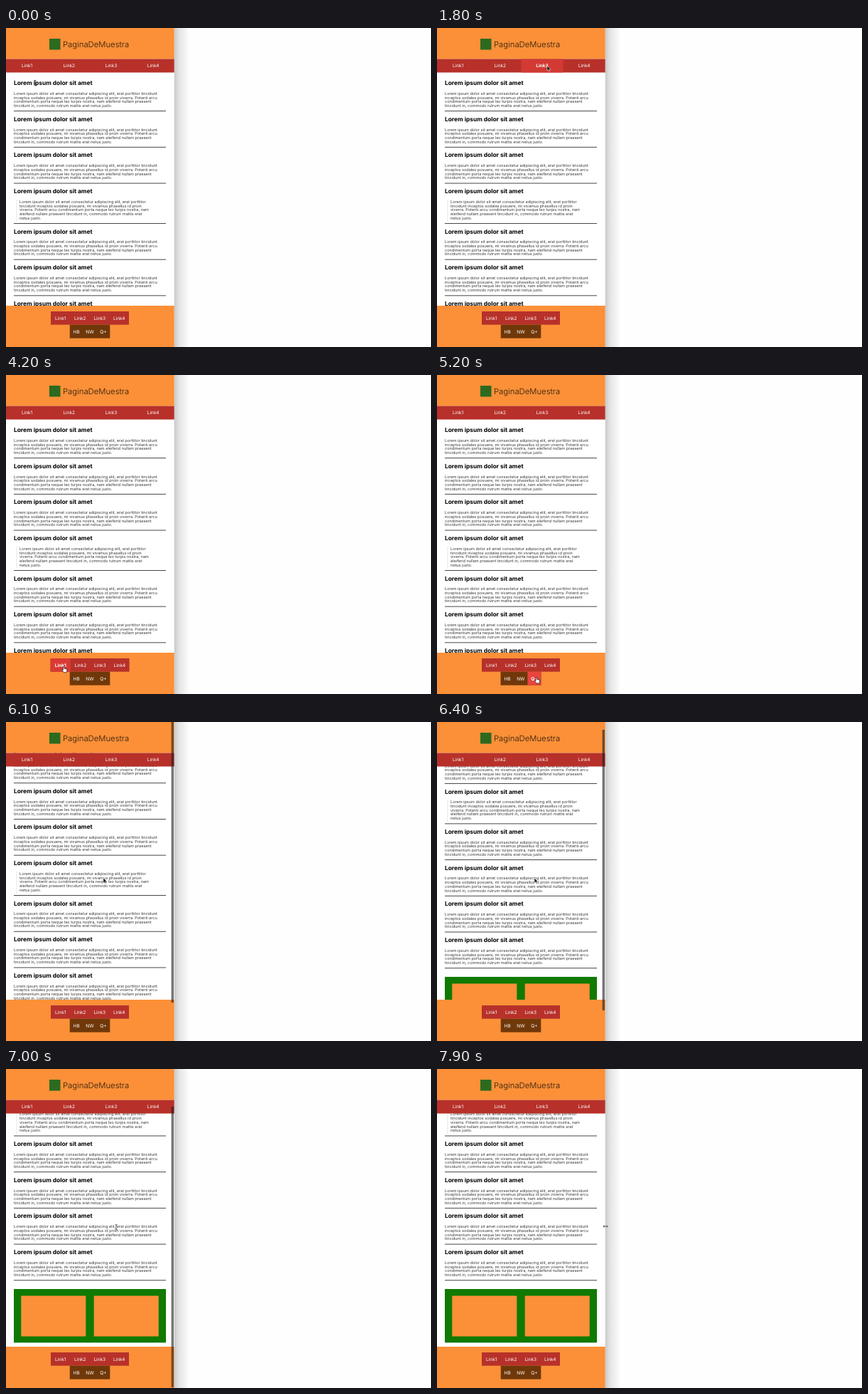
An HTML page that plays this animation: 598 by 448 pixels, repeating every 8 s.

```html
<!DOCTYPE html>
<html lang="es">
<head>
<meta charset="utf-8">
<title>Layout</title>
<style>
  html, body { margin: 0; width: 100%; height: 100%; overflow: hidden; background: #fefefe; }
  svg { display: block; width: 598px; height: 448px; }
  text { font: 400 5.55px Inter, Lato, sans-serif; fill: #3a3a3a; text-rendering: geometricPrecision; white-space: pre; }
  .heading { font-size: 8.4px; font-weight: 700; fill: #000; }
  .title { font-size: 11.3px; font-weight: 300; fill: #2b1a0c; }
  .link { font-size: 6.5px; fill: #fff; text-anchor: middle; }
  .bold { font-weight: 700; }
</style>
</head>
<body>
<svg id="stage" viewBox="0 0 598 448">
  <defs>
    <linearGradient id="shade">
      <stop offset="0" stop-color="#c6c6c6"/>
      <stop offset=".35" stop-color="#e4e4e4"/>
      <stop offset="1" stop-color="#fefefe"/>
    </linearGradient>
  </defs>
</svg>
<script>
(() => {
  const LOOP = 8000, STEP = 100, PAGE = 236.7, FOOTER = 390;
  const ORANGE = '#fb9038', RED = '#b7312a', BROWN = '#70380a', GREEN = '#107a02';
  const stage = document.getElementById('stage');

  function set(node, attrs) {
    for (const key in attrs) node.setAttribute(key, attrs[key]);
  }
  function add(parent, tag, attrs, content) {
    const node = document.createElementNS('http://www.w3.org/2000/svg', tag);
    set(node, attrs);
    if (content) node.textContent = content;
    return parent.appendChild(node);
  }
  const rect = (parent, x, y, width, height, fill) =>
    add(parent, 'rect', { x, y, width, height, fill });
  const label = (parent, x, y, content, cls = '') =>
    add(parent, 'text', { x, y, class: cls }, content);

  const ramp = (t, start, end) => Math.max(0, Math.min(1, (t - start) / (end - start)));
  const smooth = u => u * u * (3 - 2 * u);

  // Resting points of the pointer: time, x, y
  const stops = [
    [100, 41, 77], [500, 32, 53], [1800, 155, 53], [2550, 205, 54],
    [3100, 162, 406], [4100, 77, 406], [4450, 99, 425], [5200, 140, 425],
    [5450, 140, 424], [5950, 137, 219], [6600, 137, 219], [7000, 155, 222], [7700, 237, 221]
  ];
  function pointerAt(t) {
    const i = stops.findIndex(([time]) => time > t);
    if (i <= 0) return stops.at(i).slice(1);
    const [t0, x0, y0] = stops[i - 1], [t1, x1, y1] = stops[i];
    const u = smooth(ramp(t, t0, t1));
    return [x0 + (x1 - x0) * u, y0 + (y1 - y0) * u];
  }
  const scrollAt = t => smooth(ramp(t, 5900, 6660));

  const paragraph = [
    'Lorem ipsum dolor sit amet consectetur adipiscing elit, erat porttitor tincidunt',
    'inceptos sodales posuere, mi vivamus phasellus id proin viverra. Potenti arcu',
    'condimentum porta neque leo turpis nostra, nam eleifend nullam praesent',
    'tincidunt in, commodo rutrum mattis erat netus justo.'
  ];
  const quote = [
    'Lorem ipsum dolor sit amet consectetur adipiscing elit, erat porttitor',
    'tincidunt inceptos sodales posuere, mi vivamus phasellus id proin',
    'viverra. Potenti arcu condimentum porta neque leo turpis nostra, nam',
    'eleifend nullam praesent tincidunt in, commodo rutrum mattis erat',
    'netus justo.'
  ];

  rect(stage, 236, 0, 22, 448, 'url(#shade)');
  rect(stage, 0, 0, PAGE, 448, '#fff');

  // Scrolling content
  const content = add(stage, 'g', {});
  let baseline = 80;
  for (let i = 0; i < 8; i++) {
    const quoted = i === 3, lines = quoted ? quote : paragraph;
    const height = lines.length * 5.7;
    label(content, 11, baseline, 'Lorem ipsum dolor sit amet', 'heading');
    lines.forEach((line, n) =>
      label(content, quoted ? 19 : 11, baseline + 13.8 + n * 5.7, line));
    if (quoted) rect(content, 14.5, baseline + 9, 0.8, 31, '#ddd');
    rect(content, 11, baseline + 13.4 + height, 214, 0.9, '#333');
    baseline += 27.9 + height;
  }
  rect(content, 11, 489.5, 214, 75.3, GREEN);
  for (const x of [21.3, 123.7]) rect(content, x, 499, 91, 57, ORANGE);

  // Fixed header and footer
  rect(stage, 0, 0, PAGE, 43.5, ORANGE);
  rect(stage, 61, 15, 15.5, 15.5, '#2c6a1f');
  label(stage, 80, 26.8, 'PaginaDeMuestra', 'title');
  rect(stage, 0, FOOTER, PAGE, 448 - FOOTER, ORANGE);

  // A row of equal cells that light up under the pointer; grow widens the bold cell.
  function makeBar(items, x, y, w, h, fill, hover, grow) {
    const cellW = w / items.length;
    const center = i => x + (i + 0.5) * cellW;
    const back = rect(stage, x, y, w, h, fill);
    const cells = items.map((_, i) => rect(stage, x + i * cellW, y, cellW, h, hover));
    const labels = items.map((item, i) => label(stage, center(i), y + h / 2 + 2.3, item, 'link'));
    const hit = t => {
      const [px, py] = pointerAt(t);
      return py >= y && py < y + h ? Math.floor((px - x) / cellW) : -1;
    };
    return t => {
      const recent = [0, 50, 100, 150].map(ago => hit(t - ago));
      const active = recent[0];
      const extra = items[active] ? grow : 0;
      set(back, { x: x - extra, width: w + 2 * extra });
      items.forEach((_, i) => {
        set(cells[i], { opacity: recent.filter(n => n === i).length / recent.length });
        set(labels[i], {
          x: center(i) + Math.sign(i - active) * extra,
          class: i === active ? 'link bold' : 'link'
        });
      });
    };
  }
  const links = ['Link1', 'Link2', 'Link3', 'Link4'];
  const bars = [
    makeBar(links, 0, 43.5, PAGE, 19, RED, '#d23a33', 0),
    makeBar(links, 63, 398, 110, 18.7, RED, '#d93a35', 0.6),
    makeBar(['HB', 'NW', 'Q+'], 89.7, 416.7, 56.6, 19, BROWN, '#e9443e', 0.2)
  ];

  const thumb = rect(stage, 232.6, 0, 3.4, 394, '#1a1a1a');

  // Pointer shapes, hot spot at the origin
  const pointer = add(stage, 'g', { 'stroke-linejoin': 'round' });
  const shape = (d, fill, stroke, width) =>
    add(pointer, 'path', { d, fill, stroke, 'stroke-width': width });
  const shapes = {
    arrow: shape('M0 0V7L1.6 5.6 2.7 8 3.8 7.5 2.8 5.2H5Z', '#111', '#fff', 0.5),
    hand: shape('M-1 0Q0-1 .7 0V2.4L4.5 3.2V6L3.6 8H0L-2.6 4.7-1.8 4-1 4.6Z', '#fff', '#111', 0.7),
    beam: shape('M-1.5-3.5Q0-3.5 0-2.7Q0-3.5 1.5-3.5M0-3V3M-1.5 3.5Q0 3.5 0 2.7Q0 3.5 1.5 3.5', 'none', '#333', 0.8),
    resize: shape('M-3.5 0L-1.7-1.7V-.5H1.7V-1.7L3.5 0 1.7 1.7V.5H-1.7V1.7Z', '#111', '#fff', 0.3)
  };
  function pointerShape(x, y, scrolling) {
    if (x > 230) return 'resize';
    if (y > FOOTER) return 'hand';
    return y < 63 || scrolling ? 'arrow' : 'beam';
  }

  function draw(t) {
    const progress = scrollAt(t);
    set(content, { transform: `translate(0 ${-180.5 * progress})` });
    bars.forEach(update => update(t));

    // The thumb trails behind the page, then fades out.
    const visible = ramp(t, 5850, 5950) - ramp(t, 7200, 7500);
    set(thumb, { y: 53 * progress ** 5, opacity: 0.6 * visible });

    const [x, y] = pointerAt(t);
    set(pointer, { transform: `translate(${x} ${y})` });
    const current = pointerShape(x, y, progress > 0 && progress < 1);
    for (const name in shapes) shapes[name].style.display = name === current ? '' : 'none';
  }

  let started;
  function tick(now) {
    started ??= now;
    draw(Math.floor(((now - started) % LOOP) / STEP) * STEP);
    requestAnimationFrame(tick);
  }
  draw(0);
  requestAnimationFrame(tick);
})();
</script>
</body>
</html>
```
